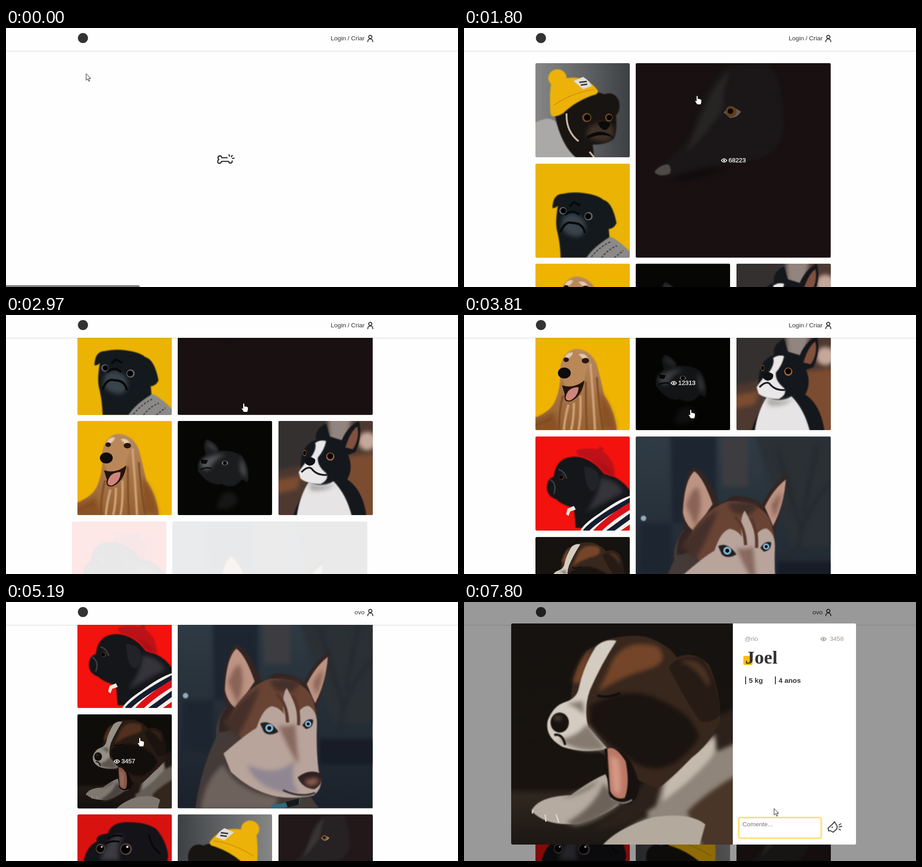
Write an HTML page that moves like this. It is 987 px wide and 567 px high and loops after 8 s.

```html
<!DOCTYPE html>
<html lang="pt">
<head>
<meta charset="utf-8">
<title>Feed</title>
<style>
html, body { margin: 0; width: 987px; height: 567px; overflow: hidden; background: #fefefe; }
body { position: relative; font: 13.6px/16px "Liberation Sans", Arial, sans-serif; color: #333; }
div, .abs { position: absolute; }
.fill { left: 0; top: 0; width: 987px; height: 567px; }
.photo { overflow: hidden; border-radius: 3px; }
.photo > svg { width: 100%; height: 100%; display: block; }
.flip > svg { transform: scaleX(-1); }
.views { inset: 0; background: rgba(0,0,0,.3); color: #fff; display: flex; align-items: center; justify-content: center; gap: 3px; -webkit-text-stroke: .3px #fff; }
#header { left: 0; top: 0; width: 987px; height: 50px; background: #fefefe; box-shadow: 0 1px 1px rgba(0,0,0,.14); }
#user { right: 204px; top: 15px; white-space: pre; }
#shade { background: rgba(0,0,0,.4); }
#modal { left: 103px; top: 47px; width: 753px; height: 484px; background: #fff; border-radius: 3px; overflow: hidden; transform-origin: 376.5px 242px; }
#modal > * { position: absolute; white-space: pre; }
.muted { color: #9d948a; }
.fact { top: 116px; border-left: 2px solid #333; padding-left: 6px; font: bold 15.3px/17px "Liberation Sans", Arial, sans-serif; }
#field { left: 497px; top: 425px; width: 178px; height: 43px; border: 1px solid #eee; border-radius: 3px; background: #eee; color: #757575; }
#field.focus { border-color: #fb1; background: #fff; box-shadow: 0 0 0 2.5px #fea; }
#caret { left: 7px; top: 6px; width: 1px; height: 15px; background: #333; }
.line { fill: none; stroke: #333; stroke-width: 2; stroke-linecap: round; stroke-linejoin: round; }
.soft { filter: blur(5px); }
.fur { filter: blur(1.2px); }
</style>
</head>
<body>
<svg width="0" height="0" class="abs">
<defs>
  <linearGradient id="wall"><stop stop-color="#868686"/><stop offset=".5" stop-color="#626466"/><stop offset="1" stop-color="#3d4043"/></linearGradient>
  <linearGradient id="room" x2="0" y2="1"><stop stop-color="#303c45"/><stop offset="1" stop-color="#1b212b"/></linearGradient>
  <linearGradient id="hair" x2="0" y2="1"><stop stop-color="#b98a60"/><stop offset="1" stop-color="#96602f"/></linearGradient>
  <linearGradient id="barn" x2="0" y2="1"><stop stop-color="#15120f"/><stop offset=".74" stop-color="#18130f"/><stop offset=".78" stop-color="#2f261f"/><stop offset="1" stop-color="#1c1713"/></linearGradient>
</defs>

<symbol id="hat" viewBox="0 0 206 206">
  <path fill="url(#wall)" d="M0 0H206V206H0z"/>
  <path class="fur" fill="#aaa9a7" d="M-4 132Q30 112 46 130Q60 175 92 210H-4z"/>
  <path class="fur" fill="#181412" d="M42 112L68 96Q110 50 150 68Q172 60 182 82Q187 104 176 114Q179 150 171 166Q150 180 125 178L128 206H88Q56 180 42 112z"/>
  <path class="soft" fill="#3f3025" d="M118 138Q150 122 170 140Q175 164 155 172Q125 172 110 158z"/>
  <path fill="#0b0a0a" d="M137 130Q152 124 163 132Q160 146 150 146Q138 142 137 130zM112 160Q145 138 172 164Q145 150 113 166z"/>
  <g fill="#6f4a23"><circle cx="112" cy="119" r="10"/><ellipse cx="160" cy="119" rx="8" ry="9"/></g>
  <circle cx="113" cy="119" r="7"/><circle cx="161" cy="119" r="6"/>
  <path fill="none" stroke="#c9b49f" stroke-width="4" d="M68 110Q66 148 94 171M118 194L128 206"/>
  <path class="fur" fill="#ecb209" d="M33 112Q30 70 34 46A20 19 0 1 1 68 33Q112 26 136 60Q138 68 126 70Q86 84 60 110Q46 118 37 116z"/>
  <path fill="none" stroke="#cf9604" stroke-width="2" d="M40 92Q85 62 128 58"/>
  <path fill="#deddd8" d="M83 39L104 30Q118 38 123 50L104 57z"/>
  <path stroke="#333" stroke-width="3" d="M96 42L112 40M99 48L113 46"/>
</symbol>

<symbol id="sweater" viewBox="0 0 206 206">
  <path fill="#ebb404" d="M0 0H206V206H0z"/>
  <path class="fur" fill="#13191d" d="M37 97Q38 66 60 66Q85 60 116 66Q138 70 148 79Q168 84 177 130Q172 142 160 143L162 165L125 206H55Q54 175 48 150Q42 130 49 92Q44 98 37 97z"/>
  <path class="soft" fill="#39434a" d="M60 118Q80 98 105 122Q118 150 95 160Q65 160 56 138z"/>
  <path fill="none" stroke="#070a0c" stroke-width="5" d="M55 150Q64 124 82 130Q104 130 108 152M64 112Q82 98 96 112M74 94L84 84L98 92"/>
  <g fill="#65666a"><circle cx="60" cy="103" r="8"/><circle cx="116" cy="115" r="9"/></g>
  <circle cx="61" cy="103" r="6"/><circle cx="115" cy="115" r="6.500"/>
  <path class="fur" fill="#8b8a88" d="M110 208Q124 184 163 160Q178 164 210 196V208z"/>
  <path fill="none" stroke="#4e4e50" stroke-width="3" stroke-dasharray="5 3" d="M122 204Q142 180 166 170M144 206Q160 186 178 180M172 206L192 190"/>
</symbol>

<symbol id="afghan" viewBox="0 0 206 206">
  <path fill="#efb402" d="M0 0H206V206H0z"/>
  <path class="fur" fill="url(#hair)" d="M-4 180Q34 166 44 140Q56 110 54 76Q60 28 92 28Q122 32 134 62Q144 100 150 130Q172 160 178 210H-4z"/>
  <path class="soft" fill="#8a5122" d="M-4 186L40 166L52 210H-4zM140 120Q170 160 176 206L146 200z"/>
  <path class="fur" fill="#b98758" d="M54 72Q58 38 80 36Q112 38 116 62Q108 80 106 100Q92 130 64 128Q70 105 52 86z"/>
  <path class="fur" fill="#e2cbb2" d="M64 46Q70 34 82 36Q80 46 68 50zM94 40Q108 36 114 48L104 50z"/>
  <path class="fur" fill="none" stroke="#cda27a" stroke-width="5" d="M72 150Q64 180 62 206M84 146Q84 180 78 206M98 130Q100 175 94 206M120 60Q126 130 130 206"/>
  <path class="fur" fill="none" stroke="#7d4d28" stroke-width="4" d="M60 130Q50 170 52 206M110 100Q110 160 112 206M134 90Q138 150 148 206M0 196L36 180"/>
  <path fill="#25130d" d="M58 108Q84 116 107 97Q102 132 77 143Q60 146 64 128z"/>
  <path fill="#cf857c" d="M66 134Q70 112 94 112Q94 132 76 141Q65 142 66 134z"/>
  <ellipse cx="63" cy="81" rx="14" ry="12" fill="#0e0b0a"/>
  <ellipse cx="67" cy="52" rx="6" ry="5" fill="#2a160c"/><ellipse cx="109" cy="54" rx="8" ry="6" fill="#2a160c"/>
</symbol>

<symbol id="fluffy" viewBox="0 0 206 206">
  <path fill="#060605" d="M0 0H206V206H0z"/>
  <path class="fur" fill="#1b1c1e" d="M44 96Q56 78 62 72Q52 54 64 40Q84 48 90 66Q118 62 140 76Q158 104 153 134L140 128Q122 152 96 138Q70 144 44 110z"/>
  <path class="soft" fill="#55575a" d="M50 88Q80 70 104 74Q80 82 70 106Q50 112 50 88zM60 48Q80 50 86 68zM136 80Q150 100 148 124L138 112z"/>
  <path fill="#090909" d="M50 84L66 86L62 94L52 93z"/>
  <path fill="none" stroke="#0a0a0a" stroke-width="3" d="M50 106Q64 100 74 104"/>
  <ellipse cx="103" cy="92" rx="7" ry="5" fill="#777067"/><circle cx="103" cy="92" r="4"/>
  <path class="soft" fill="#161617" d="M92 166Q120 140 132 176Q112 200 84 190z"/>
</symbol>

<symbol id="boston" viewBox="0 0 206 206">
  <path fill="#4e3930" d="M0 0H206V206H0z"/>
  <path class="soft" fill="#33302f" d="M-9 -9H108V84L-9 110z"/>
  <path class="soft" fill="#92857f" d="M108 -9H160L144 76H114z"/>
  <path class="soft" fill="#7c4c31" d="M130 80L216 70V216H150zM-9 130L50 120L40 150L-9 160z"/>
  <circle class="soft" cx="194" cy="44" r="20" fill="#c6a89b"/>
  <path class="fur" fill="#14171b" d="M82 42Q78 18 104 6L112 34L138 42Q152 10 176 0Q184 34 168 68L152 74Q164 104 150 128Q184 150 192 208H32Q44 170 66 140Q40 118 52 72Q60 48 82 42z"/>
  <path class="fur" fill="#81503f" d="M146 58Q156 24 172 12Q178 40 162 62z"/>
  <path class="fur" fill="#e6e4e4" d="M40 208Q46 164 66 134Q96 148 120 132Q148 160 160 208z"/>
  <path class="soft" fill="#aaa6a6" d="M66 134Q96 148 124 136Q108 156 70 152z"/>
  <path class="fur" fill="#e9e7e7" d="M44 112Q58 90 72 78Q84 60 80 48Q92 40 104 44Q100 64 86 80Q84 98 104 114Q112 128 92 138Q62 138 48 126z"/>
  <path fill="#101114" d="M56 84Q68 74 80 84Q82 96 68 98Q57 96 56 84z"/>
  <path fill="none" stroke="#202024" stroke-width="4" d="M50 112Q64 98 72 104Q84 120 106 118"/>
  <circle cx="113" cy="78" r="9" fill="#a06038"/><circle cx="113" cy="77" r="6.500"/>
  <ellipse cx="57" cy="70" rx="4" ry="7" fill="#84502f"/><ellipse cx="57" cy="70" rx="3" ry="5"/>
</symbol>

<symbol id="beret" viewBox="0 0 206 206">
  <path fill="#f3120d" d="M0 0H206V206H0z"/>
  <path class="fur" fill="#15161a" d="M25 110Q26 92 40 88Q44 50 76 45Q106 40 136 66L150 82Q185 88 206 118V140L110 200H88L84 156Q58 150 46 138Q24 130 25 110z"/>
  <path class="soft" fill="#34343a" d="M142 90Q180 96 192 122L110 166Q138 130 142 90z"/>
  <path class="fur" fill="#222328" d="M106 66Q136 68 139 88Q140 116 124 120Q108 112 106 66z"/>
  <path fill="none" stroke="#3d3d42" stroke-width="3" d="M32 94Q48 104 40 126M50 72Q64 76 68 92"/>
  <circle cx="57" cy="89" r="6" fill="#422b22"/><circle cx="56" cy="89" r="4"/>
  <path class="fur" fill="#bd1218" d="M88 32Q100 23 138 28V24Q146 21 148 26L147 33Q174 52 173 86Q156 90 140 66Q118 46 94 42z"/>
  <path class="soft" fill="#8c0e14" d="M96 40Q120 42 144 66Q160 84 168 84Q140 50 96 40z"/>
  <path fill="#eee7e0" d="M70 158L84 152L88 160L76 164L72 174L67 170z"/>
  <path fill="#f2eee8" d="M98 206Q106 190 140 168Q180 138 206 130V206z"/>
  <path fill="none" stroke="#151d30" stroke-width="11" d="M108 208Q135 178 210 138M158 210L210 172"/>
  <path fill="none" stroke="#dd1018" stroke-width="14" d="M130 212Q156 182 210 150M190 212L210 198"/>
</symbol>

<symbol id="close" viewBox="0 0 206 206">
  <path fill="#d8120f" d="M0 0H206V206H0z"/>
  <path class="fur" fill="#131318" d="M14 98Q24 66 42 60Q38 44 66 42Q74 18 106 17Q150 16 172 32Q194 58 198 90L180 206H30z"/>
  <path class="soft" fill="#3b3b42" d="M58 80Q74 40 100 46Q84 70 92 100H50z"/>
  <path fill="none" stroke="#08080b" stroke-width="4" d="M66 54Q78 42 98 48M60 64Q76 56 92 60M156 44Q160 70 180 86"/>
  <g fill="#51413b"><ellipse cx="50" cy="75" rx="10" ry="11"/><circle cx="106" cy="76" r="13"/></g>
  <circle cx="50" cy="75" r="8"/><circle cx="105" cy="76" r="10"/>
  <g fill="#ddd"><circle cx="53" cy="71" r="2"/><circle cx="109" cy="71" r="2.500"/></g>
</symbol>

<symbol id="shadow" viewBox="0 0 426 426">
  <path fill="#221719" d="M0 0H426V426H0z"/>
  <path class="soft" fill="#262122" d="M40 236Q104 190 126 140Q146 56 196 8L290 0Q322 40 322 120Q330 190 262 212Q160 220 100 244Q50 256 40 236z"/>
  <path class="soft" fill="#383434" d="M150 100Q176 36 206 18Q188 64 190 100Q160 150 110 196z"/>
  <path class="fur" fill="#6f6765" d="M42 236Q56 220 72 222Q80 234 74 242Q54 250 42 240z"/>
  <path class="soft" fill="#171012" d="M80 252Q150 226 200 232Q150 250 100 260z"/>
  <path fill="#8d8079" d="M192 108Q206 88 230 106Q222 120 206 120z"/>
  <circle cx="208" cy="106" r="12" fill="#8a5a25"/><circle cx="207" cy="105" r="6"/>
</symbol>

<symbol id="husky" viewBox="0 0 426 426">
  <path fill="url(#room)" d="M0 0H426V426H0z"/>
  <path class="soft" fill="#1d2630" d="M76 0H176V190H80zM10 190H78V300H10z"/>
  <path class="soft" fill="#3d3d41" d="M186 0H246V110H190z"/>
  <path class="soft" fill="#2b3035" d="M260 0H430V240H340z"/>
  <path class="soft" fill="none" stroke="#22272c" stroke-width="6" d="M356 250Q360 170 426 100M360 200L310 30M366 170L396 20"/>
  <path class="soft" fill="#171c27" d="M310 274H430V330H310z"/>
  <circle class="fur" cx="17" cy="179" r="6" fill="#91abc0"/>
  <path class="fur" fill="#443a38" d="M38 428Q50 340 84 270Q80 230 112 196L240 300L290 400L310 428z"/>
  <path class="soft" fill="#6d625c" d="M50 428Q60 360 100 330Q130 390 220 402L210 428z"/>
  <path class="fur" fill="#332523" d="M100 168Q104 88 126 67Q150 66 184 150L212 130Q256 130 276 150Q290 114 330 81Q336 100 302 214L180 240L90 260Q90 220 106 206z"/>
  <path class="fur" fill="#bd9483" d="M103 166Q106 96 128 76Q148 90 168 148L128 208Q108 194 103 166zM282 154Q300 116 328 94Q324 150 300 196z"/>
  <path class="soft" fill="#8a6357" d="M110 150Q124 110 136 112Q150 150 130 196zM296 150Q312 124 318 124Q312 160 302 178z"/>
  <path class="fur" fill="#694435" d="M112 230Q142 164 200 142Q268 138 292 180Q308 220 302 260L150 290z"/>
  <path class="soft" fill="#453029" d="M100 240Q130 190 180 160Q160 220 130 270zM200 148Q240 136 270 150L250 172L214 168z"/>
  <path class="fur" fill="#b9a49c" d="M100 306Q150 262 172 250Q186 206 206 202Q224 206 232 220Q226 180 238 162Q254 190 262 216Q280 196 290 204Q304 216 304 240Q302 300 308 344Q322 380 296 398Q250 406 216 400Q160 388 116 346z"/>
  <path class="soft" fill="#8f8691" d="M150 330Q220 360 256 320Q244 370 266 392Q180 396 150 330z"/>
  <path class="soft" fill="#87695e" d="M220 244Q240 250 256 240L264 330Q244 300 220 244z"/>
  <path class="fur" fill="none" stroke="#5a392c" stroke-width="7" d="M216 176Q238 194 240 238M252 178Q266 204 264 244"/>
  <path class="fur" fill="#231f21" d="M180 240Q200 230 220 258Q200 270 188 258zM272 244Q284 226 296 232Q296 250 280 252z"/>
  <circle cx="200" cy="250" r="9" fill="#76a9c6"/><circle cx="285" cy="241" r="7" fill="#76a9c6"/>
  <circle cx="200" cy="250" r="4"/><circle cx="285" cy="241" r="3"/>
  <path class="fur" fill="#2d2021" d="M262 358Q286 338 314 350Q318 374 298 384Q272 382 262 358z"/>
  <path class="soft" fill="#8a5a4c" d="M276 366Q296 354 310 364Q300 382 284 376z"/>
  <path class="fur" fill="none" stroke="#332a2c" stroke-width="4" d="M230 386Q266 404 300 392"/>
  <path fill="#2d6a7c" d="M204 418Q240 416 268 402L266 416Q240 426 206 428z"/>
  <path fill="#15181c" d="M236 412L266 404L264 418L240 424z"/>
</symbol>

<symbol id="puppy" viewBox="0 0 484 484">
  <path fill="url(#barn)" d="M0 0H484V484H0z"/>
  <path class="soft" fill="#8f857a" d="M290 400Q330 310 400 270L496 214V496H210Q240 450 300 424z"/>
  <path class="soft" fill="#c3b9ac" d="M336 350Q370 290 456 244L440 290Q400 340 330 390z"/>
  <path class="soft" fill="#493629" d="M384 412Q430 366 496 330V496H420z"/>
  <path class="soft" fill="#2c211b" d="M440 210L496 180V260L450 280zM286 350L340 310L316 400L250 440L180 452L260 392z"/>
  <path class="fur" fill="#b5aba0" d="M44 410Q60 378 130 376Q176 342 206 330L236 396Q204 420 150 438Q76 446 44 410z"/>
  <path class="soft" fill="#6d6259" d="M120 436Q180 404 202 350L240 392Q190 436 140 444zM110 384Q170 370 190 344L150 366z"/>
  <path class="fur" fill="#b3a99d" d="M196 490Q226 450 310 424Q390 412 424 440L410 490z"/>
  <path class="fur" fill="#38271d" d="M130 176Q130 110 164 62Q214 20 290 28Q340 42 362 74Q400 58 432 90Q458 150 456 214Q436 262 394 294Q350 340 320 362L270 340Q210 288 180 276z"/>
  <path class="soft" fill="#744529" d="M134 130Q146 78 176 54L154 130zM222 80Q250 32 320 50Q350 84 300 100Q240 116 190 150z"/>
  <path class="soft" fill="#1a1411" d="M172 180Q260 130 330 170Q400 200 410 250Q350 340 280 310Q210 270 172 220z"/>
  <path class="fur" fill="#271b15" d="M344 96Q366 66 412 76Q450 110 456 200Q440 220 412 214Q376 160 344 96z"/>
  <path class="soft" fill="#4b3222" d="M366 84Q400 70 424 100Q440 130 430 140Q400 90 366 84z"/>
  <path class="fur" fill="#d5ccc1" d="M118 172Q144 164 148 140Q158 94 184 52Q204 32 230 38Q196 90 172 146Q158 186 168 226Q190 252 210 274Q160 286 112 270Q72 248 80 212Q92 180 118 172z"/>
  <path class="soft" fill="#857a70" d="M104 254Q140 250 166 220L208 274Q150 288 104 254zM120 176L156 170L160 200Q140 180 120 176z"/>
  <path class="fur" fill="none" stroke="#110d0b" stroke-width="5" d="M188 158Q214 164 238 152M94 244Q112 240 118 266"/>
  <ellipse class="fur" cx="106" cy="217" rx="20" ry="22" fill="#17120f"/>
  <ellipse class="soft" cx="102" cy="207" rx="9" ry="5" fill="#55493f"/>
  <path class="fur" fill="#17110f" d="M204 274Q256 268 276 340Q286 372 262 394Q224 402 213 372z"/>
  <path class="fur" fill="none" stroke="#81766c" stroke-width="4" d="M216 382Q240 402 264 386"/>
  <path class="fur" fill="#ba7764" d="M210 274Q228 266 250 302Q260 352 248 382Q226 388 216 366z"/>
  <path class="soft" fill="#d39884" d="M216 290L234 296Q244 350 236 376L222 366z"/>
  <path stroke="#ddd5ca" stroke-width="3" d="M48 408L46 416M74 418L76 434M98 418L104 436"/>
</symbol>

<symbol id="eye" viewBox="0 0 14 10">
  <path fill="none" stroke="currentColor" stroke-width="1.400" d="M1 5Q7 -2.500 13 5Q7 12.500 1 5z"/><circle cx="7" cy="5" r="2" fill="currentColor"/>
</symbol>
</svg>

<div id="feed" class="fill"><div></div><div></div></div>

<div id="header">
  <svg class="abs" width="987" height="50">
    <circle cx="168" cy="22" r="11" fill="#333"/>
    <g class="line"><circle cx="795.500" cy="19.500" r="3.500"/><path d="M790 30C790 22 801 22 801 30"/></g>
  </svg>
  <div id="user"></div>
</div>

<div id="status" style="left:0;top:563px;width:292px;height:6px;border-radius:0 3px 0 0;background:#808080"></div>

<div id="shade" class="fill"></div>
<div id="modal">
  <svg width="484" height="484"><use href="#puppy"/></svg>
  <span class="muted" style="left:510px;top:26px">@rio</span>
  <svg class="muted" style="left:675px;top:29px" width="14" height="10"><use href="#eye"/></svg>
  <span class="muted" style="right:27px;top:26px">3458</span>
  <i style="left:507px;top:71px;width:20px;height:20px;border-radius:3px;background:#fb1"></i>
  <b style="left:511px;top:50px;font:bold 41px/48px 'Liberation Serif',serif">Joel</b>
  <span class="fact" style="left:511px">5 kg</span>
  <span class="fact" style="left:576px">4 anos</span>
  <div id="field"><span class="abs" style="left:7px;top:6px">Comente...</span><div id="caret"></div></div>
  <svg class="line" style="left:690px;top:430px" width="36" height="32">
    <path d="M2 18L11 10L16 4L22 14L21 20L13 27L8 24L3 24zM26 11L30 8.500M26 15.500L32 14M25.500 20L29 22"/><circle cx="11" cy="16" r=".6"/>
  </svg>
</div>

<svg id="loader" class="abs fill"><path class="line" style="stroke-width:2.600"/></svg>

<svg id="cursor" class="abs" style="left:0;top:0;overflow:visible" width="20" height="24" fill="#fff" stroke="#111" stroke-linejoin="round">
  <path d="M0 0V14.500L3.300 11.300L5.700 16.700L8 15.700L5.600 10.400H10z"/>
  <path stroke-width=".8" d="M-1.500 1.500Q0 -1 1.700 1.500V7Q3.500 5.800 4.600 7.500Q6.300 6.500 7.300 8.200Q9.500 7.600 9.600 10V14Q9 17 8 19.500H0Q-1.500 16.500 -4.500 12.500Q-5 10 -1.500 12z"/>
  <path fill="none" d="M-3 -8Q0 -8 0 -6V6Q0 8 -3 8M3 -8Q0 -8 0 -6M0 6Q0 8 3 8"/>
</svg>

<script>
const LOOP = 8000, LEFT = 155.5, TOP = 76.8, CELL = 206.1, PITCH = 219.7;
const $ = id => document.getElementById(id);
const show = (el, on) => { el.style.visibility = on ? 'visible' : 'hidden'; };

// picture, column, row, span, views, mirrored
const photos = [
  ['hat', 0, 0, 1, 25481], ['shadow', 1, 0, 2, 68223], ['sweater', 0, 1, 1, 9120],
  ['afghan', 0, 2, 1, 7741], ['fluffy', 1, 2, 1, 12313], ['boston', 2, 2, 1, 5832],
  ['beret', 0, 3, 1, 6410], ['husky', 1, 3, 2, 15204], ['puppy', 0, 4, 1, 3457],
  ['close', 0, 5, 1, 2875], ['hat', 1, 5, 1, 4126, true], ['shadow', 2, 5, 1, 3390]
].map(([name, col, row, span, views, mirrored], i) => {
  const x = LEFT + col * PITCH, y = TOP + row * PITCH, size = CELL + (span - 1) * PITCH;
  const el = document.createElement('div');
  el.className = mirrored ? 'photo flip' : 'photo';
  el.style.cssText = `left:${x}px;top:${y}px;width:${size}px;height:${size}px`;
  el.innerHTML = `<svg><use href="#${name}"/></svg><div class="views">` +
    `<svg width="14" height="10"><use href="#eye"/></svg>${views}</div>`;
  $('feed').children[i < 6 ? 0 : 1].append(el);
  return { x, y, size, views: el.lastChild };
});

const scrollKeys = [[2210, 0], [2650, 284], [3080, 284], [3650, 470], [3880, 470], [4400, 710]];
const cursorKeys = [
  [250, 175, 100], [1500, 509, 148], [2300, 509, 148], [2900, 519, 193], [3100, 519, 193],
  [3750, 495, 207], [3880, 495, 207], [4500, 470, 230], [4710, 470, 230], [5120, 292, 297],
  [5500, 292, 297], [6140, 480, 380], [6220, 480, 380], [6850, 690, 490], [7300, 690, 490], [7590, 677, 452]
];

const clamp = v => Math.min(1, Math.max(0, v));

function track(keys, t) {
  const next = keys.findIndex(k => k[0] > t);
  if (next === 0) return keys[0].slice(1);
  if (next < 0) return keys[keys.length - 1].slice(1);
  const a = keys[next - 1], b = keys[next], p = (t - a[0]) / (b[0] - a[0]);
  const eased = p * p * (3 - 2 * p);
  return a.slice(1).map((v, i) => v + (b[i + 1] - v) * eased);
}

// The bone is eaten from the right, then starts whole again.
const boneLeft = 'M471 284C470 278 463 279 463 284Q463 287 465 288C460 291 463 298 467 296Q470 295 471 292';
const crumbs = x => `M${x} 277.500l1 3M${x + 7} 279l-2 3M${x + 11} 285l-3.500 .5`;
const bones = [
  boneLeft + 'H486C487 297 494 297 494 291M471 284H483' + crumbs(487),
  boneLeft + 'H482M471 284H478' + crumbs(482),
  boneLeft + 'H474M471 284H472' + crumbs(476),
  boneLeft + 'H486C487 298 494 298 494 293Q494 290 492 288C497 285 494 278 490 280Q487 281 486 284H471'
];

function enter(page, visible, p, power) {
  show(page, visible);
  page.style.transform = `translateX(${-20 * (1 - p)}px)`;
  page.style.opacity = p ** power;
}

function draw(t) {
  const scroll = Math.round(track(scrollKeys, t)[0]);
  const [cx, cy] = track(cursorKeys, t);
  const open = t >= 5460, loaded = t >= 1650;
  const pages = $('feed').children;

  $('feed').style.transform = `translateY(${-scroll}px)`;
  enter(pages[0], loaded, clamp((t - 1450) / 280), 1);
  enter(pages[1], t >= 2850, clamp((t - 2850) / 300), 2.6);

  let hovering = false;
  photos.forEach((p, i) => {
    const inside = cx > p.x && cx < p.x + p.size && cy + scroll > p.y && cy + scroll < p.y + p.size;
    const hover = inside && !open && cy > 50 && t >= (i < 6 ? 1650 : 2850);
    p.views.style.display = hover ? 'flex' : 'none';
    hovering = hovering || hover;
  });

  $('user').textContent = t < 4300 ? 'Login / Criar' : 'ovo';
  show($('status'), t < 70);

  const grow = clamp((t - 5930) / 300);
  show($('shade'), open);
  show($('modal'), grow > 0);
  $('modal').style.opacity = grow;
  $('modal').style.transform = `scale(${0.8 + 0.2 * grow})`;
  $('field').className = t >= 7300 ? 'focus' : '';
  $('caret').style.opacity = t >= 7300 && t < 7800 ? 1 : 0;

  show($('loader'), !loaded || (t >= 2500 && t < 2850) || (open && grow === 0));
  $('loader').style.transform = `translateY(${open ? 0 : -scroll}px)`;
  $('loader').firstChild.setAttribute('d', bones[Math.floor(t / 150) % 4]);

  const typing = grow === 1 && cx > 601 && cx < 780 && cy > 473 && cy < 518;
  const shape = hovering ? 1 : typing ? 2 : 0;
  [...$('cursor').children].forEach((el, i) => show(el, i === shape));
  $('cursor').style.transform = `translate(${cx}px,${cy}px)`;
}

const start = performance.now();
function tick() {
  draw((performance.now() - start) % LOOP);
  requestAnimationFrame(tick);
}
tick();
</script>
</body>
</html>
```
